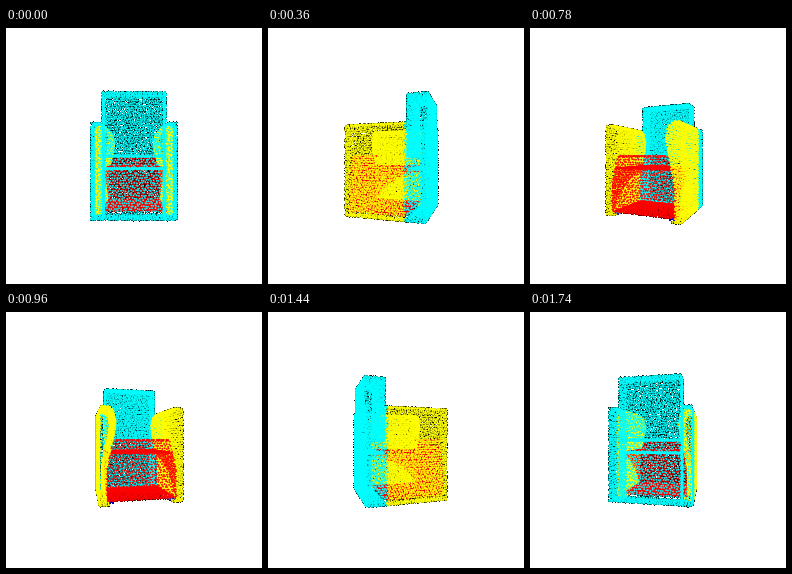
Animation, 256 px wide and 256 px high, one loop 1800 ms. Source, as a matplotlib script:

```python
import numpy as np
import matplotlib.pyplot as plt
from matplotlib.animation import FuncAnimation

SIZE, FRAMES, LOOP_MS = 256, 30, 1800
DIST, FOV = 3.0, 60
RADIUS = 0.01 * SIZE / 2      # splat radius in pixels
LAYERS = 8                    # splats blended per pixel
GAP = 0.0292                  # spacing of surface samples
JITTER = 0.3

CYAN, YELLOW, BLUE, RED = (0, 1, 1), (1, 1, 0), (0, 0, 1), (1, 0, 0)

# Armchair dimensions: x across, y up, z towards the front
FLOOR, TOP, ARM_TOP = -0.727, 0.728, 0.377
REAR, REST, FRONT = -0.492, -0.25, 0.49
OUT, HALF = 0.489, 0.362
DECK, BASE, LIP = -0.15, -0.685, 0.475

# Inner wall of an arm, from its rolled top down to the floor
INNER = [(0.38, ARM_TOP), (0.33, 0.32), (0.308, 0.2), (0.33, 0.05),
         (0.375, -0.15), (0.415, -0.35), (0.415, FLOOR)]

rng = np.random.default_rng(7)
points, colors = [], []


def inner_x(y):
    xs, ys = zip(*INNER[::-1])
    return np.interp(y, ys, xs)


def sweep(path, along, color, keep=None):
    """Sample the surface made by moving a polyline along a vector."""
    path, along = np.array(path, float), np.array(along, float)
    run = np.r_[0, np.cumsum(np.linalg.norm(np.diff(path, axis=0), axis=1))]
    n = max(1, round(run[-1] / GAP))
    m = max(1, round(np.linalg.norm(along) / GAP))
    i, j = np.mgrid[:n, :m].reshape(2, -1)
    s = (i + 0.5 + rng.uniform(-JITTER, JITTER, i.size)) / n * run[-1]
    t = (j + 0.25 + i % 2 / 2 + rng.uniform(-JITTER, JITTER, j.size)) / m
    pts = np.stack([np.interp(s, run, path[:, k]) for k in range(3)], 1)
    pts += t.clip(0, 1)[:, None] * along
    if keep is not None:
        pts = pts[keep(pts)]
    # everything behind the backrest plane is cyan
    points.append(pts)
    colors.append(np.where(pts[:, 2:] < REST, CYAN, color))


def profile(pts, side, z):
    return [(side * x, y, z) for x, y in pts]


def build_arm(side):
    outer = [(OUT, FLOOR), (OUT, 0.335), (0.466, ARM_TOP), (0.38, ARM_TOP)]
    height, depth = (0, ARM_TOP - FLOOR, 0), (0, 0, FRONT - REAR)
    foot = [(HALF, FLOOR), (OUT, FLOOR)]
    sweep(profile(outer, side, REAR), depth, YELLOW)
    sweep(profile(INNER, side, REST), (0, 0, FRONT - REST), YELLOW)
    sweep(profile(foot, side, REAR), depth, YELLOW)
    sweep(profile(foot, side, REAR), height, CYAN)
    sweep(profile([(0.305, FLOOR), (OUT, FLOOR)], side, FRONT), height,
          YELLOW, lambda p: abs(p[:, 0]) > inner_x(p[:, 1]))


def build_back():
    depth, width = (0, 0, REST - REAR), (2 * HALF, 0, 0)
    sweep([(-HALF, FLOOR, REAR), (-HALF, TOP, REAR)], width, CYAN)
    sweep([(-HALF, 0, REST), (-HALF, TOP, REST)], width, CYAN)
    for y in (TOP, FLOOR, -0.005, DECK):
        sweep([(-HALF, y, REAR), (HALF, y, REAR)], depth, CYAN)
    for x in (-HALF, HALF):
        sweep([(x, FLOOR, REAR), (x, TOP, REAR)], depth, CYAN)


def build_seat():
    def between_arms(p):
        return abs(p[:, 0]) < inner_x(p[:, 1])

    def under_deck(p):
        reach = (p[:, 2] - REST) / (LIP - REST)
        return p[:, 1] > DECK - 0.08 - 0.46 * reach ** 2

    w = inner_x(BASE)
    sweep([(-w, BASE, LIP), (-w, 0, LIP)], (2 * w, 0, 0), RED, between_arms)
    sweep([(-w, BASE, REST), (-w, BASE, LIP)], (2 * w, 0, 0), RED)
    w = inner_x(DECK)
    sweep([(-w, DECK, REST), (-w, DECK, LIP)], (2 * w, 0, 0), RED)
    w = inner_x(0)
    sweep([(-w, 0, LIP), (-w, 0, LIP - 0.07)], (2 * w, 0, 0), RED)

    wall = [(inner_x(y) - 0.006, y) for y in (DECK, -0.35, BASE)]
    for side in (-1, 1):
        sweep(profile(wall, side, REST), (0, 0, LIP - REST), RED, under_deck)
        for z in (0.37, 0.45):
            sweep(profile([(0.33, -0.72), (0.42, -0.72)], side, z),
                  (0, 0.03, 0), BLUE)


for side in (-1, 1):
    build_arm(side)
build_back()
build_seat()
cloud, tint = np.vstack(points), np.vstack(colors).astype(float)

reach = np.arange(-2, 3)
DX, DY = (g.ravel() for g in np.meshgrid(reach, reach))
FOCAL = SIZE / 2 / np.tan(np.radians(FOV / 2))


def render(frame):
    """Soft point splatting, blended front to back over black."""
    azim = np.pi - 2 * np.pi * frame / FRAMES
    s, c = np.sin(azim), np.cos(azim)
    depth = DIST - cloud @ (s, 0, c)
    u = SIZE / 2 + FOCAL * (cloud @ (c, 0, -s)) / depth
    v = SIZE / 2 - FOCAL * cloud[:, 1] / depth

    px = np.floor(u).astype(int)[:, None] + DX
    py = np.floor(v).astype(int)[:, None] + DY
    d2 = (px + 0.5 - u[:, None]) ** 2 + (py + 0.5 - v[:, None]) ** 2
    who, k = np.nonzero(d2 < RADIUS ** 2)
    pixel = py[who, k] * SIZE + px[who, k]
    alpha = 1 - d2[who, k] / RADIUS ** 2

    order = np.lexsort((depth[who], pixel))
    who, pixel, alpha = who[order], pixel[order], alpha[order]
    hit, first, count = np.unique(pixel, return_index=True,
                                  return_counts=True)
    rank = np.arange(pixel.size) - np.repeat(first, count)

    image = np.ones((SIZE * SIZE, 3))
    image[hit] = 0
    clear = np.ones(SIZE * SIZE)
    for layer in range(LAYERS):
        m = rank == layer
        p, a = pixel[m], alpha[m]
        image[p] += (clear[p] * a)[:, None] * tint[who[m]]
        clear[p] *= 1 - a
    return image.reshape(SIZE, SIZE, 3).clip(0, 1)


fig = plt.figure(figsize=(2.56, 2.56), dpi=100, facecolor="white")
ax = fig.add_axes([0, 0, 1, 1])
ax.axis("off")
view = ax.imshow(render(0), interpolation="nearest", aspect="auto")


def update(frame):
    view.set_data(render(frame))
    return [view]


anim = FuncAnimation(fig, update, frames=FRAMES, interval=LOOP_MS / FRAMES,
                     repeat=True, repeat_delay=0)
plt.show()
```
